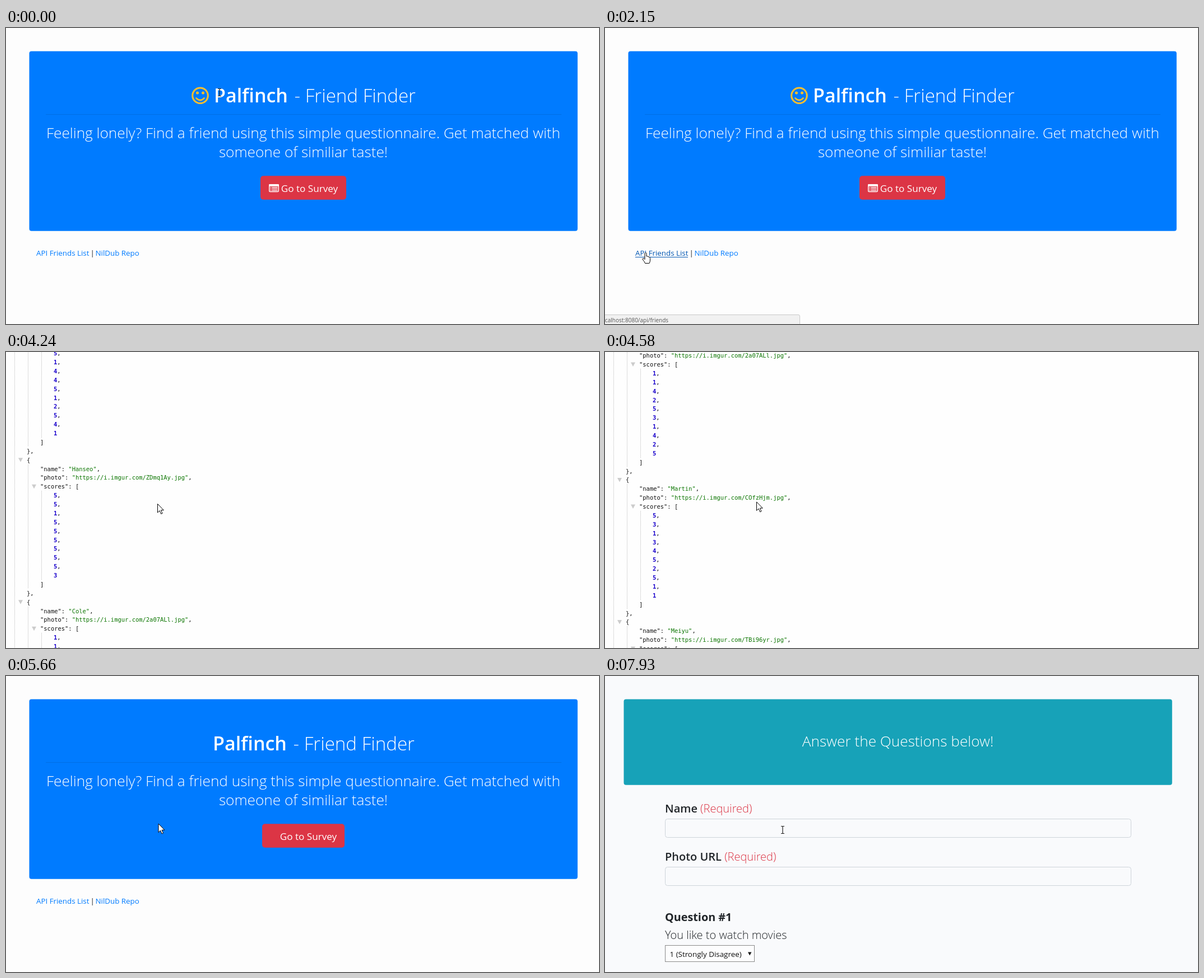
Animation, 1058 px wide and 529 px high, one loop 7990 ms. Source, as an HTML page:

```html
<!DOCTYPE html>
<html lang="en">
<head>
<meta charset="utf-8">
<title>Palfinch</title>
<style>
html, body { margin: 0; width: 100%; height: 100%; overflow: hidden; background: #fdfdfd; }
svg { display: block; width: 100%; height: 100%; }
text { font-family: "Open Sans", "Noto Sans", sans-serif; white-space: pre; }
#json text { font: 10.46px "DejaVu Sans Mono", "Noto Sans Mono", monospace; fill: #111; }
#json .str { fill: #0b7500; }
#json .num { fill: #1a01cc; font-weight: 700; }
#json line { stroke: #bbb; stroke-dasharray: 1 1; shape-rendering: crispEdges; }
#json path { fill: #ccc; }
</style>
</head>
<body>
<svg id="stage" viewBox="0 0 1058 529"></svg>
<script>
const LOOP = 7990;
const ROW = 15.875;
const TOP = 13;
const stage = document.getElementById('stage');

const text = (x, y, str, size, weight, fill, extra = '') =>
  `<text x="${x}" y="${y}" font-size="${size}" font-weight="${weight}" fill="${fill}" ${extra}>${str}</text>`;
const rect = (x, y, w, h, r, fill, extra = '') =>
  `<rect x="${x}" y="${y}" width="${w}" height="${h}" rx="${r}" fill="${fill}" ${extra}/>`;
const lead = (x, y, str) => text(x, y, str, 26.2, 300, '#fff', 'text-anchor="middle"');

function homePage() {
  const bullets = [285, 287.7, 290.3].map(y =>
    `<path d="M471.5 ${y}h1.6M474.3 ${y}h10.2" stroke="#fff" stroke-width="1.3"/>`).join('');
  return `<g id="home">
    ${rect(0, 0, 1058, 529, 0, '#fdfdfd')}
    ${rect(41.5, 41.5, 978.3, 321.3, 4, '#007bff')}
    <g id="smile" fill="none" stroke="#fbc02d" stroke-width="3" stroke-linecap="round">
      <circle cx="346.5" cy="120.7" r="13.8"/>
      <path d="M339.5 125.3Q346.5 132.5 353.5 125.3" stroke-width="2.6"/>
      <g fill="#fbc02d" stroke="none"><circle cx="341.5" cy="116" r="2.5"/><circle cx="351.5" cy="116" r="2.5"/></g>
    </g>
    <g id="title">
      ${text(371, 133, 'Palfinch', 34, 600, '#fff')}
      ${text(514.5, 133, '- Friend Finder', 33.1, 300, '#fff')}
    </g>
    ${rect(71, 154, 920, 1, 0, '#000', 'opacity=".1"')}
    ${lead(530.5, 197, 'Feeling lonely? Find a friend using this simple questionnaire. Get matched with')}
    ${lead(530.5, 230.6, 'someone of similiar taste!')}
    ${rect(454, 264.3, 153, 42.4, 5, '#dc3545', 'id="button"')}
    <g id="list" fill="none">
      ${rect(469.7, 279.7, 16.6, 12.8, 1.5, 'none', 'stroke="#fff" stroke-width="1.4"')}
      ${rect(469, 279, 18, 4, 1.5, '#fff')}
      ${bullets}
    </g>
    <g id="label">${text(490.8, 293, 'Go to Survey', 17.1, 400, '#fff')}</g>
    ${text(54, 407, 'API Friends List', 13.35, 400, '#007bff', 'id="api"')}
    ${rect(54, 409, 94, 1, 0, '#0056b3', 'id="underline"')}
    ${text(150.5, 407, '|', 13.35, 400, '#212529')}
    ${text(159.5, 407, 'NilDub Repo', 13.35, 400, '#007bff')}
  </g>`;
}

function jsonPage() {
  const friends = [
    ['Karim', 'kR4vTqe', '5144512541'],
    ['Hanseo', 'ZDmq1Ay', '5515555553'],
    ['Cole', '2a07ALl', '1142531425'],
    ['Martin', 'COfzHjm', '5313452511'],
    ['Meiyu', 'TBi96yr', '2341552133']
  ];
  let row = 0, out = '';
  const mid = r => TOP + ROW * r;
  const put = (x, str) => { out += `<text x="${x}" y="${mid(row++) + 4}">${str}</text>`; };
  const fold = x => { out += `<path d="M${x - 4} ${mid(row) - 3.5}h8l-4 7.5z"/>`; };
  const guide = (x, from, to) => {
    out += `<line x1="${x}" x2="${x}" y1="${mid(from) - 8}" y2="${mid(to) - 8}"/>`;
  };
  const str = s => `<tspan class="str">"${s}"</tspan>`;

  fold(2);
  put(13, '[');
  friends.forEach(([name, photo, scores], i) => {
    const start = row;
    fold(26);
    put(37, '{');
    put(61, `"name": ${str(name)},`);
    put(61, `"photo": ${str(`https://i.imgur.com/${photo}.jpg`)},`);
    fold(50);
    put(61, '"scores": [');
    [...scores].forEach((n, k) => put(85, `<tspan class="num">${n}</tspan>${k < 9 ? ',' : ''}`));
    put(61, ']');
    put(37, i < friends.length - 1 ? '},' : '}');
    guide(39, start + 1, row - 1);
    guide(63, start + 4, row - 2);
  });
  guide(15, 1, row);
  put(13, ']');
  return `<g id="json">${rect(0, 0, 1058, 529, 0, '#fefefe')}<g id="scroll">${out}</g></g>`;
}

function surveyPage() {
  const field = (y, name) =>
    text(107, y, `${name} <tspan font-weight="300" fill="#dc3545">(Required)</tspan>`, 20, 600, '#212529') +
    rect(107.5, y + 11.5, 831, 33, 4, 'none', 'stroke="#ced4da"');
  return `<g id="survey">
    ${rect(0, 0, 1058, 529, 0, '#f9fafc')}
    ${rect(33.5, 41.5, 978.3, 153.2, 4, '#17a2b8')}
    ${lead(522.5, 126, 'Answer the Questions below!')}
    ${field(244, 'Name')}
    ${field(330, 'Photo URL')}
    ${text(107, 438, 'Question #1', 19.8, 700, '#212529')}
    ${text(107, 470, 'You like to watch movies', 20, 300, '#212529')}
    ${rect(107.5, 481.5, 159, 29, 0, '#fdfdfe', 'stroke="#8a8a8a"')}
    ${text(115.5, 502, '1 (Strongly Disagree)', 13.4, 400, '#111')}
    <path d="M255 493.5h6.4l-3.2 6z" fill="#111"/>
  </g>`;
}

const overlays = `<g id="status">
    <path d="M-1 529V512.5H345Q347.5 512.5 347.5 515V530" fill="#f1f1f1" stroke="#c9c9c9"/>
    ${text(0, 526, '', 10, 400, '#555', 'id="url"')}
  </g>
  <g id="cursor" fill="#fff" stroke="#000" stroke-linejoin="round">
    <path id="arrow" d="M.5 .5V16L4 12.6L6.6 18.4L9 17.3L6.5 11.7H11.3Z"/>
    <path id="beam" d="M-3 -6.5H-1Q0 -6.5 0 -5.5V5.5Q0 6.5 -1 6.5H-3M3 -6.5H1Q0 -6.5 0 -5.5M0 5.5Q0 6.5 1 6.5H3" fill="none" stroke="#222" stroke-width="1.2"/>
    <path id="hand" d="M-2 .5Q-.5 -1.5 1 .5V6Q3 5 4 7Q6 6 6.5 8Q7.5 7.5 7.5 9.5V13Q7.5 16 6 18.5H-1.5Q-2 16 -6 11.5Q-6 9 -3.5 10L-2 11.5Z"/>
  </g>`;

stage.innerHTML = homePage() + jsonPage() + surveyPage() + overlays;
const $ = {};
stage.querySelectorAll('[id]').forEach(n => { $[n.id] = n; });

// Keys: [time, x, y]
const path = [
  [30, 381, 115], [150, 336, 126], [280, 347, 124], [440, 347, 124],
  [640, 500, 120], [820, 673, 123], [950, 655, 160], [1230, 344, 172],
  [1270, 344, 172], [1600, 180, 300], [1950, 73, 402], [2940, 73, 402],
  [3250, 190, 320], [3550, 270, 271], [4240, 270, 271], [4840, 270, 265],
  [5450, 270, 264], [5520, 271.5, 263.5], [5920, 271.5, 263.5], [6120, 340, 198],
  [6330, 470, 250], [6510, 575, 312], [6620, 560, 325], [6740, 522, 306],
  [6900, 508, 282], [7520, 508, 282], [7720, 380, 267], [7930, 317, 275]
];
const scrollKeys = [[4010, 0], [4240, 88.9], [4400, 300], [4600, 590], [4740, 725], [4870, 774.9]];
const shapes = [[0, 'beam'], [1340, 'arrow'], [1900, 'hand'], [2960, 'arrow'],
  [6740, 'hand'], [7540, 'arrow'], [7600, 'beam']];
const ease = p => p * p * (3 - 2 * p);
const clamp = p => Math.max(0, Math.min(1, p));

function at(keys, t, curve = p => p) {
  let i = 0;
  while (i < keys.length - 2 && t > keys[i + 1][0]) i++;
  const [a, b] = [keys[i], keys[i + 1]];
  const p = curve(clamp((t - a[0]) / (b[0] - a[0])));
  return a.slice(1).map((v, k) => v + (b[k + 1] - v) * p);
}

const show = (node, on) => node.setAttribute('display', on ? 'inline' : 'none');
const set = (node, name, value) => node.setAttribute(name, value);
const mix = (a, b, p) => `rgb(${a.map((v, i) => Math.round(v + (b[i] - v) * p))})`;
const RED = [220, 53, 69], HOVER = [200, 35, 51], ACTIVE = [190, 33, 48];

function draw(t) {
  const json = t >= 2930 && t < 5660;
  const survey = t >= 7360;
  show($.json, json);
  show($.survey, survey);
  show($.home, !json && !survey);
  set($.scroll, 'transform', `translate(0 ${-at(scrollKeys, t)[0]})`);

  // Icons arrive a moment after the page returns
  const bare = t >= 5660 && t < 5690;
  show($.smile, !bare);
  show($.list, !bare);
  const nudge = `translate(${bare ? -2 : 0} 0)`;
  set($.title, 'transform', nudge);
  set($.label, 'transform', nudge);
  set($.button, 'x', bare ? 457 : 454);
  set($.button, 'width', bare ? 147 : 153);
  set($.button, 'fill', t < 7240 ? mix(RED, HOVER, clamp((t - 6740) / 150)) : mix(HOVER, ACTIVE, clamp((t - 7220) / 50)));

  const linked = t >= 1900 && t < 2930;
  show($.underline, linked);
  set($.api, 'fill', linked ? '#0056b3' : '#007bff');

  const first = t >= 2100 && t < 2930;
  const second = t >= 7010 && t < 7540;
  show($.status, first || second);
  set($.status, 'opacity', t < 2150 || (t > 7000 && t < 7060) ? 0.5 : 1);
  $.url.textContent = 'calhost:8080/' + (first ? 'api/friends' : 'survey');

  const [x, y] = at(path, t, ease);
  set($.cursor, 'transform', `translate(${x.toFixed(1)} ${y.toFixed(1)})`);
  const shape = shapes.filter(s => t >= s[0]).pop()[1];
  ['arrow', 'beam', 'hand'].forEach(id => show($[id], id === shape));
}

const start = performance.now();
function tick() {
  draw((performance.now() - start) % LOOP);
  requestAnimationFrame(tick);
}
tick();
</script>
</body>
</html>
```
